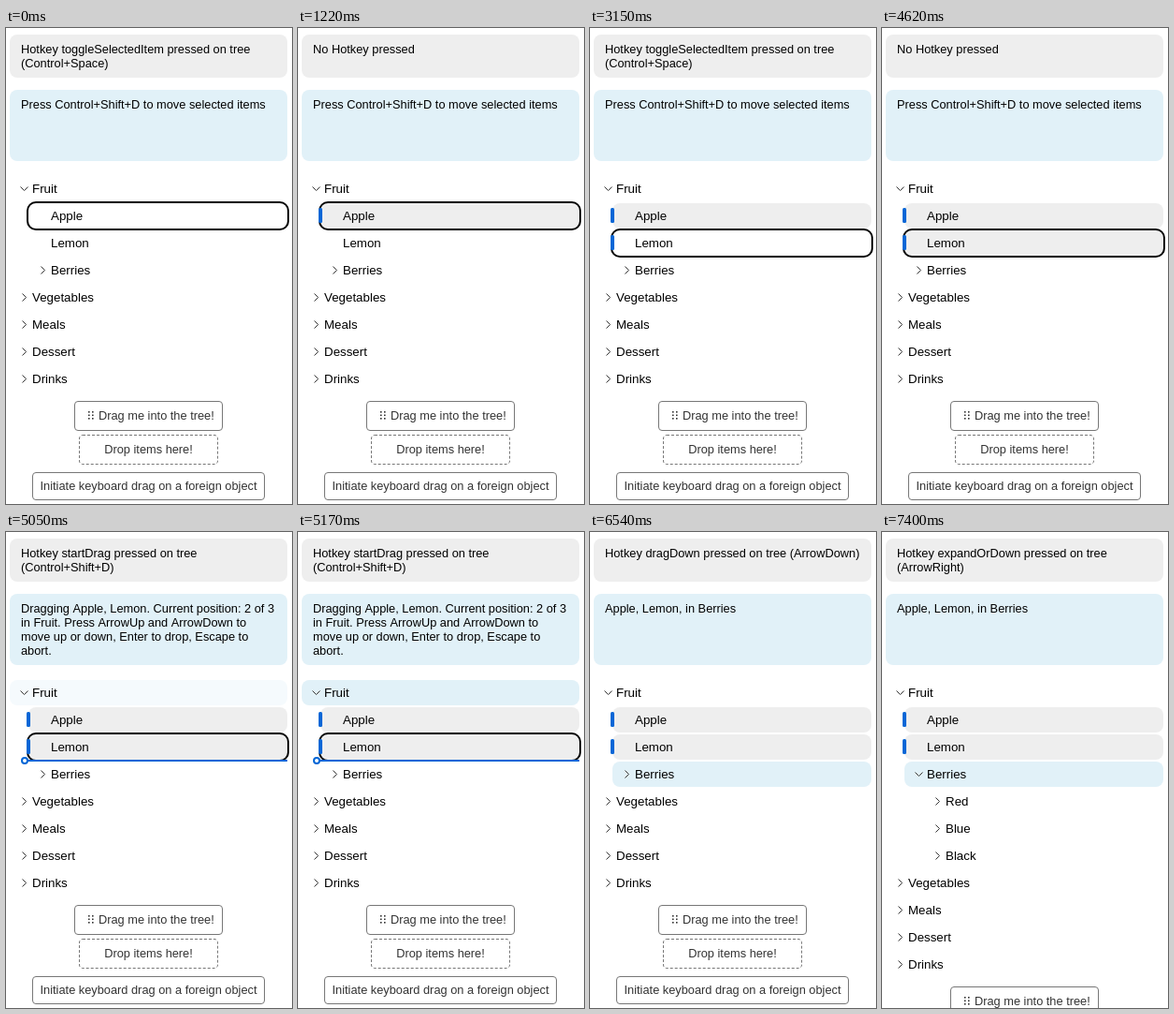
An HTML page with a canvas that plays this animation: 306x508 px, repeating every 8 s.

```html
<!DOCTYPE html>
<html lang="en">
<head>
<meta charset="utf-8">
<title>Keyboard drag and drop in a tree</title>
<style>
  html, body { margin: 0; width: 100%; height: 100%; overflow: hidden; background: #fff; }
  canvas { display: block; width: 306px; height: 508px; }
</style>
</head>
<body>
<canvas id="stage"></canvas>
<script>
const W = 306, H = 508, LOOP = 8000;
const ROW_TOP = 158, ROW_STEP = 29, ROW_HEIGHT = 27, INDENT = 20;
const GRAY = '#eeeeee', LIGHT = '#e1f1f8', BLUE = '#0366d6';
const SMALL = '12.8px "Liberation Sans", Arial, sans-serif';
const NORMAL = '13.333px "Liberation Sans", Arial, sans-serif';

const canvas = document.getElementById('stage');
const ctx = canvas.getContext('2d', { alpha: false });
const scale = window.devicePixelRatio || 1;
canvas.width = W * scale;
canvas.height = H * scale;

const T = {
  release1: 550, selectApple: 1110, focusLemon: 2210, selectLemon: 3150,
  release2: 4620, startDrag: 5050, dragDown: 6480, expand: 7340, unfold: 7400
};

const toggle = 'Hotkey toggleSelectedItem pressed on tree\n(Control+Space)';
const hotkeys = [
  [0, toggle],
  [T.release1, 'No Hotkey pressed'],
  [T.focusLemon, 'Hotkey focusNextItem pressed on tree\n(ArrowDown)'],
  [T.selectLemon, toggle],
  [T.release2, 'No Hotkey pressed'],
  [T.startDrag, 'Hotkey startDrag pressed on tree\n(Control+Shift+D)'],
  [T.dragDown, 'Hotkey dragDown pressed on tree (ArrowDown)'],
  [T.expand, 'Hotkey expandOrDown pressed on tree\n(ArrowRight)']
];
const messages = [
  [0, 'Press Control+Shift+D to move selected items'],
  [T.startDrag, 'Dragging Apple, Lemon. Current position: 2 of 3\nin Fruit. Press ArrowUp and ArrowDown to\nmove up or down, Enter to drop, Escape to\nabort.'],
  [T.dragDown, 'Apple, Lemon, in Berries']
];

const latest = (list, t) => list.filter(([at]) => at <= t).pop()[1];

// Short background transition: a partial step, then the final colour.
function fade(t, at, hold, partial) {
  if (t < at) return 0;
  return t < at + hold ? partial : 1;
}

function box(x, y, w, h, color, alpha = 1) {
  if (alpha <= 0) return;
  ctx.globalAlpha = alpha;
  ctx.fillStyle = color;
  ctx.beginPath();
  ctx.roundRect(x, y, w, h, 8);
  ctx.fill();
  ctx.globalAlpha = 1;
}

function outline(x, y, w, h, radius, width, color, dash = []) {
  ctx.strokeStyle = color;
  ctx.lineWidth = width;
  ctx.setLineDash(dash);
  ctx.beginPath();
  ctx.roundRect(x + width / 2, y + width / 2, w - width, h - width, radius);
  ctx.stroke();
  ctx.setLineDash([]);
}

function label(text, x, y, font, color = '#000', align = 'left') {
  ctx.font = font;
  ctx.fillStyle = color;
  ctx.textAlign = align;
  text.split('\n').forEach((line, i) => ctx.fillText(line, x, y + i * 15));
}

function chevron(x, y, open) {
  ctx.save();
  ctx.translate(x, y);
  if (open) ctx.rotate(Math.PI / 2);
  ctx.strokeStyle = '#333';
  ctx.lineWidth = 1;
  ctx.beginPath();
  ctx.moveTo(-2, -4);
  ctx.lineTo(2, 0);
  ctx.lineTo(-2, 4);
  ctx.stroke();
  ctx.restore();
}

function drawRow(item, index) {
  const { name, depth, open, bg = GRAY, fill = 0, selected, focused } = item;
  const x = 4 + depth * INDENT;
  const y = ROW_TOP + index * ROW_STEP;
  box(x, y, 301 - x, ROW_HEIGHT, bg, fill);
  if (focused) outline(x - 2, y - 2, 305 - x, ROW_HEIGHT + 4, 9, 2, '#000');
  if (selected) {
    ctx.fillStyle = BLUE;
    ctx.beginPath();
    ctx.roundRect(x - 2, y + 5, 4, 16, 1.5);
    ctx.fill();
  }
  if (open !== undefined) chevron(x + 15.5, y + 13.5, open);
  label(name, x + 24, y + 18, NORMAL);
}

function treeItems(t) {
  const leave = fade(t, T.dragDown, 60, 0.35);
  const unfolded = t >= T.unfold;
  const branch = (name, depth) => ({ name, depth, open: false });
  return [
    { name: 'Fruit', depth: 0, open: true, bg: LIGHT,
      fill: fade(t, T.startDrag, 120, 0.35) * (1 - leave) },
    { name: 'Apple', depth: 1, fill: fade(t, T.selectApple, 110, 0.35),
      selected: t >= T.selectApple, focused: t < T.focusLemon },
    { name: 'Lemon', depth: 1, fill: fade(t, T.selectLemon, 60, 0),
      selected: t >= T.selectLemon, focused: t >= T.focusLemon && t < T.dragDown },
    { name: 'Berries', depth: 1, open: unfolded, bg: LIGHT, fill: leave },
    ...(unfolded ? ['Red', 'Blue', 'Black'].map(name => branch(name, 2)) : []),
    ...['Vegetables', 'Meals', 'Dessert', 'Drinks'].map(name => branch(name, 0))
  ];
}

function drawDropLine() {
  const y = ROW_TOP + 3 * ROW_STEP - 1;
  ctx.fillStyle = BLUE;
  ctx.fillRect(23, y - 1, 278, 2);
  ctx.fillStyle = '#fff';
  ctx.strokeStyle = BLUE;
  ctx.lineWidth = 2;
  ctx.beginPath();
  ctx.arc(20, y, 3, 0, Math.PI * 2);
  ctx.fill();
  ctx.stroke();
}

function drawButtons(top) {
  const border = '#777', ink = '#333';
  outline(73, top, 159, 32, 3.5, 1, border);
  ctx.fillStyle = ink;
  for (let i = 0; i < 6; i++) {
    ctx.fillRect(88 + (i % 2) * 4, top + 11 + (i >> 1) * 3.5, 1.6, 1.6);
  }
  label('Drag me into the tree!', 99, top + 20, SMALL, ink);
  outline(78, top + 36, 149, 32, 3.5, 1, border, [3, 2]);
  label('Drop items here!', 152.5, top + 56, SMALL, ink, 'center');
  outline(28, top + 76, 249, 30, 3.5, 1, border);
  label('Initiate keyboard drag on a foreign object', 152.5, top + 95, SMALL, ink, 'center');
}

function draw(t) {
  ctx.setTransform(scale, 0, 0, scale, 0, 0);
  ctx.fillStyle = '#fff';
  ctx.fillRect(0, 0, W, H);

  box(4, 7, 297, 46, GRAY);
  label(latest(hotkeys, t), 16, 27, SMALL);
  box(4, 66, 297, 76, LIGHT);
  label(latest(messages, t), 16, 86, SMALL);

  const items = treeItems(t);
  items.forEach(drawRow);
  if (t >= T.startDrag && t < T.dragDown) drawDropLine();
  drawButtons(ROW_TOP + items.length * ROW_STEP + 8);
}

const start = performance.now();
function tick() {
  draw((performance.now() - start) % LOOP);
  requestAnimationFrame(tick);
}
tick();
</script>
</body>
</html>
```
